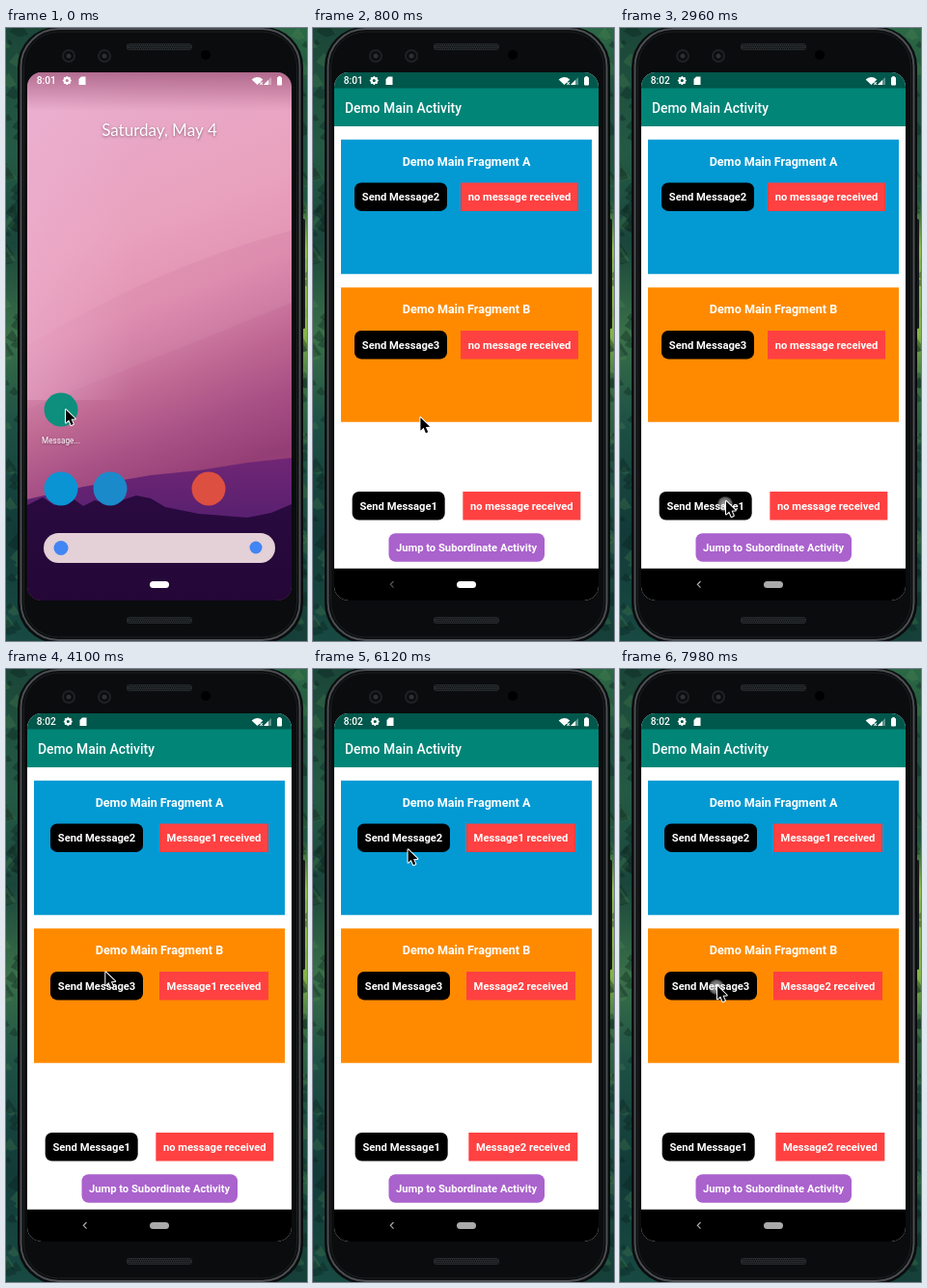
An HTML page with a canvas for the animation above (8000 ms loop, 312x636 px).

```html
<!DOCTYPE html>
<html lang="en">
<head>
<meta charset="utf-8">
<title>Messaging demo</title>
<style>
html, body { margin: 0; width: 100%; height: 100%; overflow: hidden; background: #0b0d0f; }
canvas { display: block; width: 312px; height: 636px; }
</style>
</head>
<body>
<canvas id="stage"></canvas>
<script>
const W = 312, H = 636, LOOP = 8000;
const SCREEN = { x: 22, y: 46, w: 274, h: 548 };
const LAUNCH = 330, LAUNCH_TIME = 420;
const canvas = document.getElementById('stage');
const ratio = window.devicePixelRatio || 1;
canvas.width = W * ratio;
canvas.height = H * ratio;
const ctx = canvas.getContext('2d');

// time, x, y of the pointer tip
const POINTER = [
  [0, 62, 396], [300, 62, 396], [520, 108.5, 400], [900, 112, 405], [1520, 123, 480],
  [2100, 110, 491], [3400, 110, 491], [4700, 98, 175], [5900, 98, 175],
  [6700, 101, 241], [6950, 101, 242], [7600, 101, 329], [8000, 101, 329]
];
// start, end, x, y of each press
const PRESSES = [
  [120, 600, 61, 397], [2860, 3080, 109, 494], [5560, 5760, 97, 178], [7880, 8100, 100, 330]
];

const clamp = v => Math.max(0, Math.min(1, v));
const ramp = (t, a, b) => clamp((t - a) / (b - a));
const smooth = u => u * u * (3 - 2 * u);

function rect(x, y, w, h, color, r = 0) {
  ctx.fillStyle = color;
  ctx.beginPath();
  ctx.roundRect(x, y, w, h, r);
  ctx.fill();
}

function outline(x, y, w, h, r, color, width) {
  ctx.strokeStyle = color;
  ctx.lineWidth = width;
  ctx.beginPath();
  ctx.roundRect(x, y, w, h, r);
  ctx.stroke();
}

function disc(x, y, r, color) {
  ctx.fillStyle = color;
  ctx.beginPath();
  ctx.arc(x, y, r, 0, Math.PI * 2);
  ctx.fill();
}

function poly(points, color) {
  ctx.fillStyle = color;
  ctx.beginPath();
  points.forEach(([x, y]) => ctx.lineTo(x, y));
  ctx.closePath();
  ctx.fill();
}

function text(str, x, y, font, align = 'center', color = '#fff') {
  ctx.font = font;
  ctx.textAlign = align;
  ctx.fillStyle = color;
  ctx.fillText(str, x, y);
}

function gradient(x0, y0, x1, y1, stops) {
  const g = ctx.createLinearGradient(x0, y0, x1, y1);
  stops.forEach(([at, color]) => g.addColorStop(at, color));
  return g;
}

function seeded(seed) {
  return () => (seed = (seed * 16807) % 2147483647) / 2147483647;
}

function forest() {
  rect(0, 0, 156, H, gradient(0, 0, 0, H, [
    [0, '#1b4638'], [0.2, '#245a45'], [0.35, '#1a453b'], [0.5, '#3a7048'],
    [0.65, '#1d4f44'], [0.82, '#123a38'], [1, '#184a42']]));
  rect(156, 0, 156, H, gradient(0, 0, 0, H, [
    [0, '#2c6846'], [0.12, '#1f4f3c'], [0.28, '#205540'], [0.36, '#8dbd49'],
    [0.5, '#84b348'], [0.58, '#3a7045'], [0.72, '#1f5042'], [1, '#153f38']]));
  const rand = seeded(41);
  for (let i = 0; i < 110; i++) {
    const x = i % 2 ? rand() * 14 : W - rand() * 10;
    const y = rand() * H, s = 3 + rand() * 7;
    poly([[x - s, y], [x, y - s * 1.2], [x + s, y + s * 0.3], [x, y + s * 0.6]],
      i % 3 ? 'rgba(8,32,30,.35)' : 'rgba(90,150,85,.22)');
  }
}

function grille(y) {
  rect(125, y, 68, 7, '#25292b', 3);
  for (let row = 0; row < 3; row++) {
    for (let x = 127 + row % 2; x < 192; x += 2) rect(x, y + 1 + row * 2, 1, 1, '#0c0e0f');
  }
}

function lens(x, y) {
  disc(x, y, 7, '#1f2224');
  disc(x, y, 5, '#0b0d0f');
  disc(x, y, 2.5, '#2c3033');
}

function phone() {
  rect(305, 198, 5, 114, '#14181a', 1.5);
  rect(12, -1, 296, 639, '#0a0c0e', 41);
  outline(15.5, 1, 289, 634, 39, '#4b4f51', 2);
  outline(18.5, 4, 283, 628, 36, '#1c1f20', 1);
  grille(16);
  grille(611);
  lens(65, 29);
  lens(102, 29);
  disc(207, 28, 5, '#000');
}

// Soft dune falling away below a curve that climbs to the right
function dune(left, bend, right, alpha) {
  ctx.fillStyle = gradient(0, right, 0, left + 90, [
    [0, `rgba(165,60,120,${alpha})`], [1, 'rgba(165,60,120,0)']]);
  ctx.beginPath();
  ctx.moveTo(22, left);
  ctx.quadraticCurveTo(150, bend, 296, right);
  ctx.lineTo(296, 594);
  ctx.lineTo(22, 594);
  ctx.fill();
}

function wallpaper() {
  const { x, y, w, h } = SCREEN;
  rect(x, y, w, h, gradient(100, 60, 250, 450, [
    [0, '#e9abcb'], [0.35, '#e9a2be'], [0.55, '#e294b3'], [0.66, '#d282a7'],
    [0.75, '#c06b94'], [0.87, '#a85287'], [1, '#943e76']]));
  dune(330, 250, 210, 0.1);
  dune(395, 345, 285, 0.12);
  rect(x, y, 110, 340, gradient(22, 0, 132, 0, [
    [0, 'rgba(238,180,212,.4)'], [1, 'rgba(238,180,212,0)']]));
  poly([[22, 489], [80, 476], [150, 464], [200, 459], [250, 451], [296, 446], [296, 594], [22, 594]],
    gradient(0, 446, 0, 510, [[0, '#702674'], [1, '#582070']]));
  poly([[22, 495], [38, 487], [50, 495], [65, 485], [80, 496], [92, 490], [108, 494], [135, 485],
    [150, 488], [165, 497], [200, 504], [250, 508], [275, 503], [296, 494], [296, 594], [22, 594]],
    gradient(0, 485, 0, 594, [[0, '#2a0a40'], [1, '#240737']]));
}

function home(t) {
  wallpaper();
  const shown = 1 - ramp(t, LAUNCH - 20, LAUNCH + 160);
  ctx.save();
  ctx.globalAlpha = shown;
  rect(22, 46, 274, 40, gradient(0, 46, 0, 86, [[0, 'rgba(110,30,70,.45)'], [1, 'rgba(110,30,70,0)']]));
  ctx.translate(0, 31 * smooth(1 - shown));
  ctx.shadowColor = 'rgba(60,20,50,.55)';
  ctx.shadowBlur = 3 * ratio;
  ctx.shadowOffsetY = ratio;
  text('Saturday, May 4', 159, 112, '17px Lato, sans-serif');
  text('Message...', 57, 430.5, '8.2px Roboto, sans-serif');
  ctx.shadowColor = 'transparent';
  ctx.shadowBlur = ctx.shadowOffsetY = 0;
  disc(57, 396, 17.5, '#0e8f7d');
  disc(57, 478, 17.5, '#0a94d4');
  disc(108, 478, 17.5, '#1b8acb');
  disc(210, 478, 17.5, '#dd4f40');
  ctx.globalAlpha = Math.max(shown, 0.14);
  rect(39, 524, 240, 31, '#e4d0d7', 15.5);
  disc(57, 539.5, 7.5, '#4285f4');
  disc(259, 539, 6.5, '#4285f4');
  ctx.restore();
}

const LABEL = 'bold 11.2px Roboto, sans-serif';

// Two boxes spread evenly over the given width
function row(x, width, y, button, message) {
  const w = message.startsWith('no') ? 122 : 113;
  const gap = (width - 96 - w) / 3;
  const left = x + gap, right = left + 96 + gap;
  rect(left, y, 96, 29.5, '#000', 7);
  text(button, left + 48, y + 19, LABEL);
  rect(right, y, w, 29.5, '#ff4141');
  text(message, right + w / 2, y + 19, LABEL);
}

function fragment(y, color, name, button, message) {
  rect(29, y, 260, 139.5, color);
  text('Demo Main Fragment ' + name, 159, y + 27, 'bold 12.55px Roboto, sans-serif');
  row(29, 260, y + 44.6, button, message);
}

function app(t) {
  const first = t >= 3100, second = t >= 5780;
  const none = 'no message received', one = 'Message1 received', two = 'Message2 received';
  rect(22, 46, 274, 548, '#fff');
  rect(22, 46, 274, 17, '#00574b');
  rect(22, 62.5, 274, 39.5, '#008577');
  text('Demo Main Activity', 33, 88.4, '500 13.9px Roboto, sans-serif', 'left');
  fragment(115.8, '#0399d3', 'A', 'Send Message2', first ? one : none);
  fragment(269.3, '#ff8a00', 'B', 'Send Message3', second ? two : first ? one : none);
  row(22, 274, 481, 'Send Message1', second ? two : none);
  rect(78.5, 524.3, 161.5, 29.5, '#aa62cd', 7);
  text('Jump to Subordinate Activity', 159, 543.3, LABEL);
  rect(22, 560.7, 274, 34, '#000');
}

function appWindow(t) {
  if (t < LAUNCH) return;
  const left = 3.33 * (1 - ramp(t, LAUNCH, LAUNCH + LAUNCH_TIME)) ** 2;
  const scale = 1 - 0.12 * left, middle = 320 + 17 * left;
  const half = 274 * scale - 36 * left;
  ctx.save();
  ctx.globalAlpha = ramp(t, LAUNCH, LAUNCH + 80);
  ctx.beginPath();
  ctx.rect(0, middle - half, W, half * 2);
  ctx.clip();
  ctx.translate(159 - 2.5 * Math.min(left, 1), middle);
  ctx.scale(scale, scale);
  ctx.translate(-159, -320);
  app(t);
  ctx.restore();
}

function gear(x, y) {
  for (let i = 0; i < 8; i++) {
    const a = i * Math.PI / 4;
    disc(x + Math.cos(a) * 3.5, y + Math.sin(a) * 3.5, 1.1, '#fff');
  }
  ctx.strokeStyle = '#fff';
  ctx.lineWidth = 2;
  ctx.beginPath();
  ctx.arc(x, y, 2.6, 0, Math.PI * 2);
  ctx.stroke();
}

function statusBar(t) {
  const late = t >= 1100, dx = late ? 1 : 0;
  text(late ? '8:02' : '8:01', 31.8, 58, '500 10.2px Roboto, sans-serif', 'left');
  gear(63.3 + dx, 54.5);
  const sd = 75.5 + dx;
  poly([[sd, 53], [sd + 2.5, 50.5], [sd + 7, 50.5], [sd + 7, 59], [sd, 59]], '#fff');
  ctx.fillStyle = '#fff';
  ctx.beginPath();
  ctx.moveTo(260.5, 59);
  ctx.arc(260.5, 59, 8, -Math.PI * 0.76, -Math.PI * 0.24);
  ctx.fill();
  text('×', 264.5, 60, 'bold 7px Roboto, sans-serif');
  poly([[267, 59], [275, 59], [275, 51]], 'rgba(255,255,255,.35)');
  poly([[267, 59], [272, 59], [272, 54]], '#fff');
  rect(281, 51, 5, 8.5, '#fff', 1);
  rect(282.3, 50, 2.4, 2, '#fff');
}

function navigation(t) {
  const level = Math.round(255 - 85 * ramp(t, 2100, 2500));
  const color = `rgb(${level},${level},${level})`;
  rect(149, 574, 20, 7, color, 3.5);
  const alpha = ramp(t, 750, 900);
  if (!alpha) return;
  ctx.globalAlpha = alpha;
  ctx.strokeStyle = color;
  ctx.lineWidth = 1.2;
  ctx.beginPath();
  ctx.moveTo(83.5, 574);
  ctx.lineTo(80.3, 577.3);
  ctx.lineTo(83.5, 580.6);
  ctx.stroke();
  ctx.globalAlpha = 1;
}

function touches(t) {
  for (const [start, end, x, y] of PRESSES) {
    if (t < start || t > end) continue;
    const glow = ctx.createRadialGradient(x, y, 0, x, y, 8);
    glow.addColorStop(0, 'rgba(255,255,255,.7)');
    glow.addColorStop(0.8, 'rgba(225,225,225,.45)');
    glow.addColorStop(1, 'rgba(200,200,200,.2)');
    disc(x, y, 8, glow);
  }
}

function pointer(t) {
  let i = 0;
  while (i < POINTER.length - 2 && t >= POINTER[i + 1][0]) i++;
  const [t0, x0, y0] = POINTER[i], [t1, x1, y1] = POINTER[i + 1];
  const u = smooth(ramp(t, t0, t1));
  ctx.save();
  ctx.translate(x0 + (x1 - x0) * u, y0 + (y1 - y0) * u);
  ctx.lineJoin = 'round';
  ctx.strokeStyle = '#fff';
  ctx.lineWidth = 2;
  ctx.beginPath();
  [[0, 0], [0, 13.5], [3.2, 10.6], [5.5, 16], [7.8, 15], [5.5, 9.8], [9.8, 9.6]]
    .forEach(([x, y]) => ctx.lineTo(x, y));
  ctx.closePath();
  ctx.stroke();
  ctx.fillStyle = '#000';
  ctx.fill();
  ctx.restore();
}

function draw(t) {
  ctx.setTransform(ratio, 0, 0, ratio, 0, 0);
  forest();
  phone();
  ctx.save();
  ctx.beginPath();
  ctx.roundRect(SCREEN.x, SCREEN.y, SCREEN.w, SCREEN.h, 15);
  ctx.clip();
  if (t < LAUNCH + LAUNCH_TIME) home(t);
  appWindow(t);
  statusBar(t);
  navigation(t);
  touches(t);
  ctx.restore();
  pointer(t);
}

function tick() {
  draw(performance.now() % LOOP);
  requestAnimationFrame(tick);
}
tick();
</script>
</body>
</html>
```
